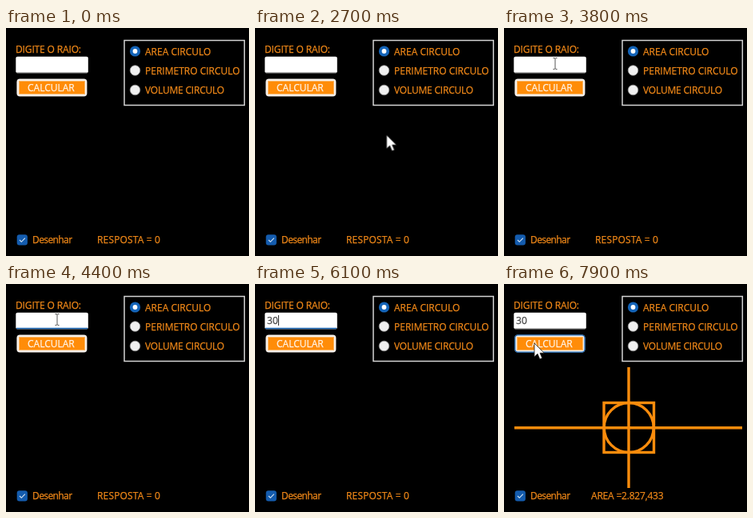
Recreate the animation shown at these times as an HTML page. Size 304x285 px, loop 8000 ms.

```html
<!DOCTYPE html>
<html lang="pt">
<head>
<meta charset="utf-8">
<title>Círculo</title>
<style>
html, body { margin: 0; width: 100%; height: 100%; overflow: hidden; background: #000; }
svg { display: block; width: 304px; height: 285px; }
text { font: 12px "Open Sans", "Noto Sans", sans-serif; fill: var(--ink); stroke: var(--ink); stroke-width: .25; }
svg { --ink: #f08818; }
.dark { --ink: #444; }
.light { --ink: #fff4e8; }
.line { fill: none; stroke: #fa8c0c; stroke-width: 3.4; }
.anim { animation: 8s step-end infinite; }

#arrow { animation: show-arrow 8s step-end infinite, move 8s infinite; }
#beam { animation-name: beam; }
#hover { animation-name: hover; }
#focus { animation-name: focus; }
#caret { animation: blink 8s step-end infinite, advance 8s step-end infinite; }
#three { animation-name: three; }
#zero { animation-name: zero; }
#before { animation-name: before; }
#after { animation-name: after; }

@keyframes show-arrow {
  0%, 45% { visibility: hidden; }
  26.25%, 86.25% { visibility: visible; }
}
@keyframes move {
  0%, 28.75% { transform: translate(203px, 197px); animation-timing-function: steps(5); }
  35% { transform: translate(155px, 118px); }
  37.5% { transform: translate(155px, 118px); animation-timing-function: steps(3); }
  41.25% { transform: translate(67px, 66px); }
  42.5% { transform: translate(67px, 66px); animation-timing-function: steps(2); }
  45% { transform: translate(64px, 45px); animation-timing-function: step-end; }
  86.25% { transform: translate(44px, 47px); animation-timing-function: steps(2); }
  88.75% { transform: translate(23px, 53px); }
  90% { transform: translate(23px, 53px); animation-timing-function: steps(3); }
  93.75%, 100% { transform: translate(38px, 74px); }
}
@keyframes beam {
  0%, 71.25% { visibility: hidden; }
  45% { visibility: visible; }
}
@keyframes hover {
  0%, 43.75% { visibility: hidden; }
  40%, 91.25% { visibility: visible; }
}
@keyframes focus {
  0%, 96.25% { visibility: hidden; }
  48.75% { visibility: visible; }
}
@keyframes blink {
  0%, 55%, 68.75%, 80%, 92.5% { visibility: hidden; }
  48.75%, 61.25%, 71.25%, 86.25% { visibility: visible; }
}
@keyframes advance {
  0% { transform: none; }
  71.25% { transform: translateX(7px); }
  73.75% { transform: translateX(14px); }
}
@keyframes three { 0% { visibility: hidden; } 71.25% { visibility: visible; } }
@keyframes zero { 0% { visibility: hidden; } 73.75% { visibility: visible; } }
@keyframes before { 0% { visibility: visible; } 97.5% { visibility: hidden; } }
@keyframes after { 0% { visibility: hidden; } 97.5% { visibility: visible; } }
</style>
</head>
<body>
<svg viewBox="0 0 304 285">
  <rect width="304" height="285"/>

  <text x="12" y="30.5" letter-spacing="-.15">DIGITE O RAIO:</text>
  <rect x="12.3" y="35.7" width="90.5" height="20.6" rx="2" fill="#fff"/>
  <path d="M13 55.8H102" stroke="#999"/>
  <path id="focus" class="anim" d="M13 55.4H102" stroke="#1a66b4" stroke-width="1.5"/>
  <g class="dark">
    <text id="three" class="anim" x="15" y="50">3</text>
    <text id="zero" class="anim" x="21.9" y="50">0</text>
  </g>
  <path id="caret" d="M15.5 39V52" stroke="#333"/>

  <rect x="13.4" y="63.5" width="88" height="22" rx="4" fill="#f6f0ea"/>
  <rect id="hover" class="anim" x="13.8" y="63.9" width="87.2" height="21.2" rx="3.5" fill="none" stroke="#1a66b4" stroke-width="1.3"/>
  <rect x="16" y="66" width="83" height="17" fill="#fbb766"/>
  <rect x="17" y="67" width="81" height="15" fill="#ff8c08"/>
  <text class="light" x="27" y="79">CALCULAR</text>

  <rect x="148" y="15.5" width="150.3" height="81" fill="none" stroke="#d4d4d4" stroke-width="1.5"/>
  <circle cx="161.5" cy="29" r="6.6" fill="#1464b8"/>
  <circle cx="161.5" cy="29" r="2.9" fill="#fff"/>
  <g fill="#f0f0f0" stroke="#8c8c8c" stroke-width=".8">
    <circle cx="161.5" cy="53" r="6.3"/>
    <circle cx="161.5" cy="77.5" r="6.3"/>
  </g>
  <text x="174" y="33.5">AREA CIRCULO</text>
  <text x="174" y="57.5">PERIMETRO CIRCULO</text>
  <text x="174" y="82" letter-spacing="-.2">VOLUME CIRCULO</text>

  <rect x="13.7" y="258.2" width="13.2" height="13.2" rx="3" fill="#145cae"/>
  <path d="M17 265l2.3 2.3 4.5-4.6" fill="none" stroke="#dce8f4" stroke-width="1.1"/>
  <text x="33" y="269" letter-spacing="-.6">Desenhar</text>
  <text id="before" class="anim" x="114" y="269" letter-spacing=".15">RESPOSTA = 0</text>

  <g id="after" class="anim">
    <text x="109" y="269" letter-spacing="-.2">AREA =2.827,433</text>
    <g class="line">
      <path d="M13 179.7H298M156 104V255"/>
      <rect x="125" y="148.5" width="62.5" height="62"/>
      <circle cx="156.2" cy="179.5" r="31"/>
    </g>
  </g>

  <path id="beam" class="anim" d="M61.5 37.5H63.2L64 38.3 64.8 37.5H66.5M64 38V51M61.5 51.5H63.2L64 50.7 64.8 51.5H66.5" fill="none" stroke="#555"/>
  <path id="arrow" d="M0 0V17L4 13.3 6.8 19.8 9.7 18.6 7 12.3H12.2Z" fill="#fff" stroke="#222" stroke-width=".8"/>
</svg>
</body>
</html>
```
